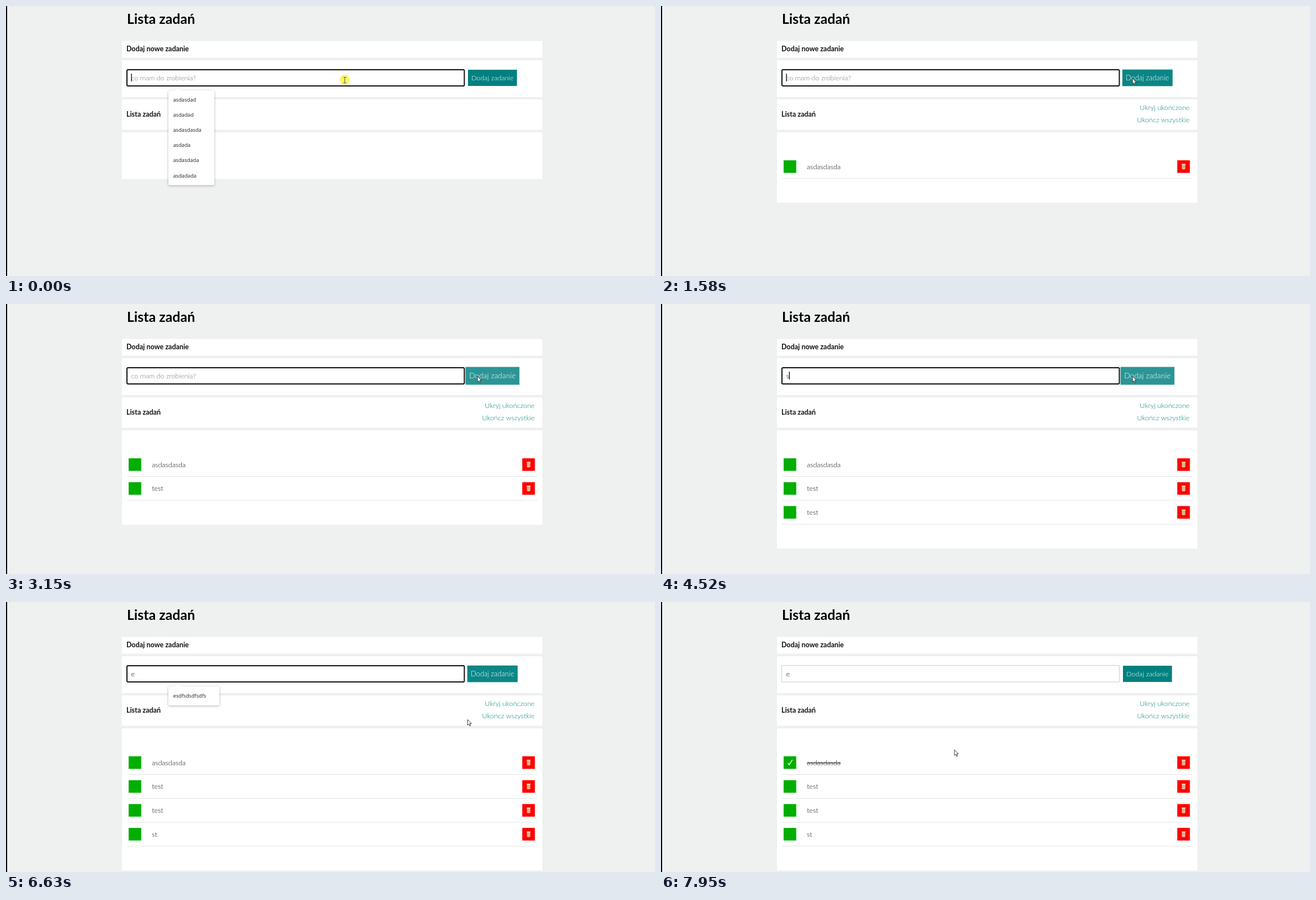
An HTML page with a canvas that plays this animation: 1159x483 px, repeating every 8 s.

```html
<!DOCTYPE html>
<html lang="pl">
<head>
<meta charset="utf-8">
<title>Lista zadań</title>
<style>
  html, body { margin: 0; width: 100%; height: 100%; overflow: hidden; background: #eff1f1; }
  canvas { display: block; }
</style>
</head>
<body>
<canvas id="stage" width="1159" height="483"></canvas>
<script>
const ctx = document.getElementById("stage").getContext("2d", { alpha: false });
const LOOP = 8000, BLINK = 530, ROW = 42.7, OPTION = 27.1;
const TEAL = "#008080";
const LIGHT = "300 12.4px Lato, sans-serif";
const BOLD = "700 12.4px Lato, sans-serif";
const TITLE = "700 24.6px Lato, sans-serif";
const SMALL = "9.2px 'Open Sans', sans-serif";

const history = [
  "asdasdad", "asdadad", "asdasdasda", "asdada", "asdasdada", "asdadada",
  "asdasdasdad", "asdasdasdasd", "asdasdasdasda", "asdasdasdada", "asdasdasdadsa",
  "test", "esdfsdsdfsdfs"
];
const tasks = [[1580, "asdasdasda"], [3150, "test"], [4100, "test"], [4800, "st"]];

// Input values by time; null is Enter, which clears without restarting the caret.
const edits = [
  [0, ""],
  ...Array.from("asdasdasda", (_, i, all) => [60 + i * 52, "asdasdasda".slice(0, i + 1)]),
  [1580, ""], [2200, "t"], [2260, "te"], [2330, "tes"], [2490, "test"], [3150, null],
  [3420, "t"], [3560, "te"], [3760, "tes"], [3960, "test"], [4100, null],
  [4520, "s"], [4590, "st"], [4800, null], [5000, "e"]
];
const pointerPath = [
  [0, 605, 132], [730, 605, 132], [1020, 685, 134], [1400, 827, 132], [1510, 842, 129.5],
  [6060, 842, 129.5], [6200, 815, 146], [6430, 758, 203], [6630, 825.5, 210],
  [6840, 560, 276], [7300, 262, 288], [7560, 230, 289], [7700, 230, 289], [7950, 524, 264.5]
];
const presses = [[0, 90], [1480, 1570], [7600, 7670]];
const blurs = [[1500, 1580], [7640, LOOP]];
const CHECK_TIME = 7740;

const within = (t, spans) => spans.some(([from, to]) => t >= from && t < to);

// The CSS "ease" curve, solved by bisection.
function ease(x) {
  if (x <= 0) return 0;
  if (x >= 1) return 1;
  let lo = 0, hi = 1, s = 0.5;
  for (let i = 0; i < 20; i++) {
    s = (lo + hi) / 2;
    const at = 0.75 * s * (1 - s) ** 2 + 0.75 * s * s * (1 - s) + s ** 3;
    if (at < x) lo = s; else hi = s;
  }
  return 0.3 * s * (1 - s) ** 2 + 3 * s * s * (1 - s) + s ** 3;
}

function pointerAt(t) {
  const i = pointerPath.findIndex(p => p[0] > t);
  if (i < 0) return pointerPath.at(-1).slice(1);
  const [t0, x0, y0] = pointerPath[i - 1], [t1, x1, y1] = pointerPath[i];
  const k = (t - t0) / (t1 - t0);
  return [x0 + (x1 - x0) * k, y0 + (y1 - y0) * k];
}

function rect(x, y, w, h, color) {
  ctx.fillStyle = color;
  ctx.fillRect(x, y, w, h);
}

function text(value, x, y, font, color, align = "left") {
  ctx.font = font;
  ctx.fillStyle = color;
  ctx.textAlign = align;
  ctx.fillText(value, x, y);
}

function line(points, color, width) {
  ctx.beginPath();
  points.forEach(([x, y]) => ctx.lineTo(x, y));
  ctx.strokeStyle = color;
  ctx.lineWidth = width;
  ctx.stroke();
}

function panel(top, bottom) {
  rect(206.5, top - 0.5, 752, bottom - top + 1, "#eaecec");
  rect(207, top, 751, bottom - top, "#fff");
}

function drawInput(value, focused, caret) {
  ctx.beginPath();
  if (focused) ctx.roundRect(216, 114, 602.5, 29, 2);
  else ctx.rect(215.5, 113.5, 603, 29.5);
  ctx.strokeStyle = focused ? "#101010" : "#ccc";
  ctx.lineWidth = focused ? 2 : 1;
  ctx.stroke();
  text(value || "co mam do zrobienia?", 223.5, 132.5, LIGHT, value ? "#000" : "#757575");
  if (caret) rect(223.4 + (value ? ctx.measureText(value).width : 0), 121, 1.3, 14, "#000");
}

function drawButton(hover) {
  ctx.save();
  ctx.translate(868.75, 128.5);
  ctx.scale(1 + hover * 0.1, 1 + hover * 0.1);
  ctx.globalAlpha = 1 - hover * 0.17;
  rect(-43.75, -14.5, 87.5, 29, TEAL);
  ctx.globalAlpha = 1;
  text("Dodaj zadanie", 0, 4, LIGHT, "#fff", "center");
  ctx.restore();
}

function drawTrash(x, y) {
  rect(x - 11.25, y - 11.25, 22.5, 22.5, "#f00");
  ctx.beginPath();
  ctx.roundRect(x - 3, y - 4.5, 6, 9.5, 1.5);
  ctx.fillStyle = "#f0c3a0";
  ctx.fill();
  rect(x - 3.5, y - 5, 7, 1.5, "#f7dcc4");
  for (const dx of [-1.2, 1.2]) rect(x + dx - 0.3, y - 2.5, 0.6, 6, "#d0694c");
}

function drawTask(name, y, done) {
  rect(219, y - 11.25, 22.5, 22.5, "#02ae02");
  text(name, 260.5, y + 4.3, LIGHT, "#111");
  if (done) {
    rect(260.5, y + 0.2, ctx.measureText(name).width, 1, "#111");
    line([[226.5, y + 0.8], [229, y + 4], [234.5, y - 5]], "#fff", 1.4);
  }
  drawTrash(933.25, y);
  rect(216, y + 20.8, 733, 1, "#e2e4e4");
}

function drawSuggestions(options) {
  const longest = Math.max(...options.map(o => o.length));
  ctx.save();
  ctx.shadowColor = "rgba(0,0,0,.3)";
  ctx.shadowBlur = 4;
  ctx.shadowOffsetY = 1;
  ctx.fillStyle = "#fff";
  ctx.beginPath();
  ctx.roundRect(290, 151, Math.min(91, 22 + 6 * longest), options.length * OPTION + 7, 2.5);
  ctx.fill();
  ctx.restore();
  ctx.beginPath();
  ctx.moveTo(299.5, 152);
  ctx.lineTo(307, 144.5);
  ctx.lineTo(314.5, 152);
  ctx.fillStyle = "#fff";
  ctx.fill();
  line([[299.5, 151], [307, 144.5], [314.5, 151]], "#e8e8e8", 0.8);
  options.forEach((o, i) => text(o, 298.5, 171 + i * OPTION, SMALL, "#222"));
}

function drawPointer(x, y, pressed) {
  if (pressed) {
    ctx.beginPath();
    ctx.arc(x, y, 9, 0, Math.PI * 2);
    ctx.fillStyle = "#fbf765";
    ctx.fill();
  }
  if (x > 216 && x < 819 && y > 114 && y < 143) {
    line([[x, y - 4.5], [x, y + 5.5]], "#555", 1);
    for (const end of [y - 4.5, y + 5.5]) line([[x - 2.5, end], [x + 2.5, end]], "#555", 1);
    return;
  }
  ctx.beginPath();
  [[0, 0], [0, 10], [2.3, 7.9], [4, 11.6], [5.6, 10.9], [4, 7.3], [7, 7.1]]
    .forEach(([dx, dy]) => ctx.lineTo(x + dx, y + dy));
  ctx.closePath();
  ctx.fillStyle = "#fff";
  ctx.fill();
  ctx.strokeStyle = "#222";
  ctx.lineWidth = 0.9;
  ctx.stroke();
}

function draw(t) {
  let value = "", blinkStart = 0;
  for (const [time, next] of edits) {
    if (time > t) break;
    value = next ?? "";
    if (next !== null) blinkStart = time;
  }
  const focused = !within(t, blurs);
  const caret = focused && Math.floor((t - blinkStart) / BLINK) % 2 === 0;
  const shown = tasks.filter(([time]) => t >= time);
  const hover = ease((t - 1400) / 1000) - ease((t - 6200) / 1000);

  rect(0, 0, 1159, 483, "#eff1f1");
  rect(0, 0, 2, 483, "#000");
  text("Lista zadań", 216, 31.8, TITLE, "#000");

  panel(62.5, 92.5);
  panel(97, 163);
  panel(167, 221.5);
  panel(226, 309.5 + shown.length * ROW);
  text("Dodaj nowe zadanie", 215, 80.5, BOLD, "#111");
  text("Lista zadań", 215, 197.5, BOLD, "#111");

  drawInput(value, focused, caret);
  drawButton(hover);
  if (shown.length) {
    text("Ukryj ukończone", 944, 186.3, LIGHT, TEAL, "right");
    text("Ukończ wszystkie", 944, 208, LIGHT, TEAL, "right");
  }
  shown.forEach(([, name], i) => drawTask(name, 287.3 + i * ROW, i === 0 && t >= CHECK_TIME));

  const options = history.filter(h => h.startsWith(value)).slice(0, 6);
  if (focused && options.length && (value || t < 60)) drawSuggestions(options);
  drawPointer(...pointerAt(t), within(t, presses));
}

const start = performance.now();
function tick() {
  draw((performance.now() - start) % LOOP);
  requestAnimationFrame(tick);
}
tick();
</script>
</body>
</html>
```
